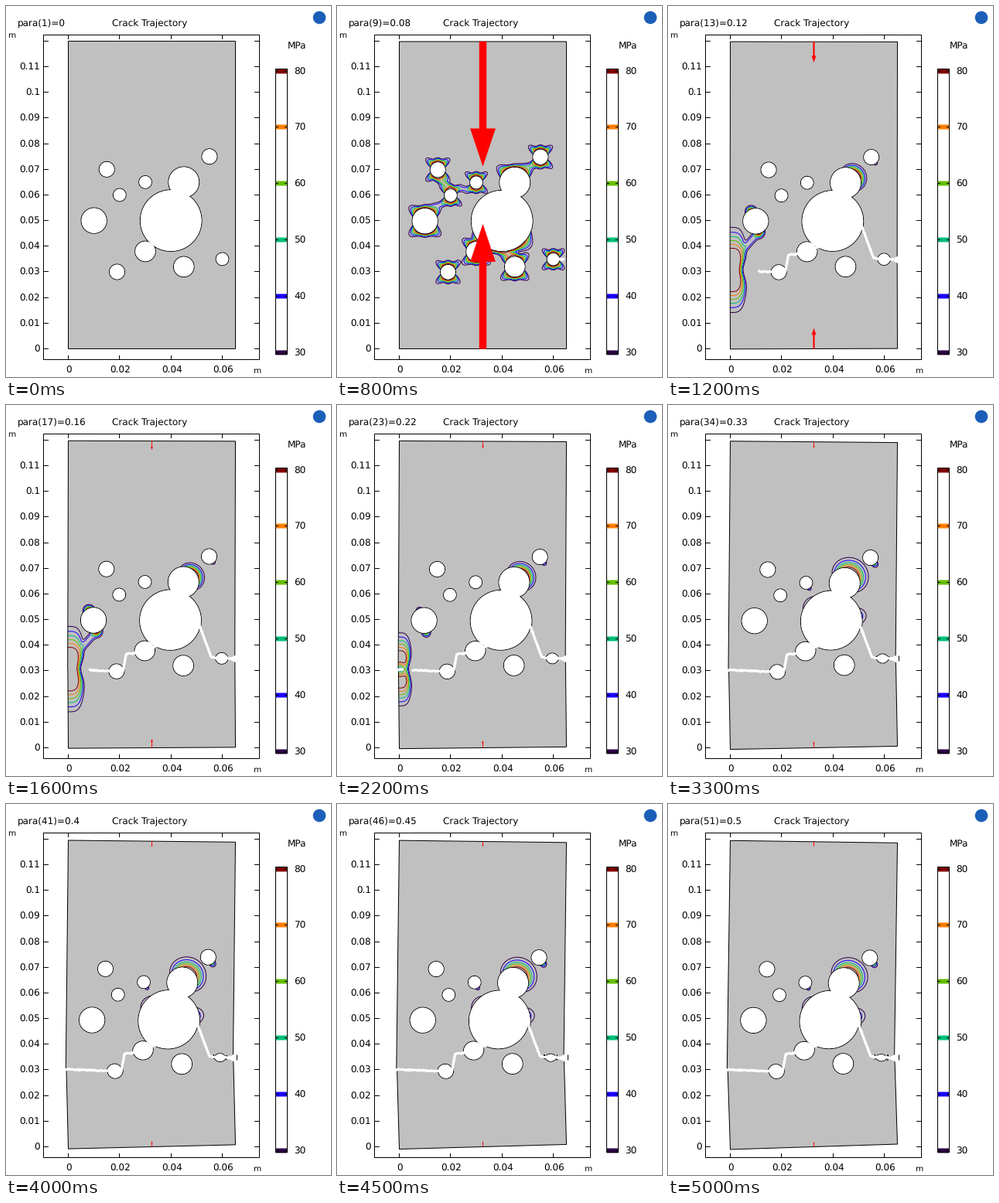
Animation, 420 px wide and 480 px high, one loop 5100 ms. Source, as a matplotlib script:

```python
import numpy as np
import matplotlib.pyplot as plt
from matplotlib.animation import FuncAnimation
from matplotlib.patches import Circle, Polygon, Rectangle

W, H, DPI = 420, 480, 100
FRAMES, STEP_MS = 51, 100
PX = 72 / DPI
SCALE = 3317                            # pixels per metre
LEFT, RIGHT, TOP, BOTTOM = 80.5, 296.5, 45.5, 443.5
MID = 188.5

LEVELS = [30, 40, 50, 60, 70, 80]
COLORS = ["#300048", "#1a00ff", "#00be78", "#64be00", "#ff7d00", "#820000"]

# hole centre and radius in millimetres
HOLES_MM = [(15, 70, 3), (10, 50, 5), (20, 60, 2.5), (30, 65, 2.5), (45, 65, 6),
            (40, 50, 12), (30, 38, 4), (19, 30, 3), (45, 32, 4), (60, 35, 2.5),
            (55, 75, 3)]
MM = SCALE / 1000
HOLES = [(LEFT + x * MM, BOTTOM - y * MM, r * MM) for x, y, r in HOLES_MM]

CRACK = np.array([(78, 341), (140, 344), (152, 343), (156, 322), (180, 318),
                  (251, 285), (266, 326), (299, 328)], float)

plt.rcParams.update({"font.family": "DejaVu Sans", "path.snap": False,
                     "text.hinting": "none"})
fig = plt.figure(figsize=(W / DPI, H / DPI), dpi=DPI, facecolor="white")
ax = fig.add_axes([0, 0, 1, 1])
ax.set_xlim(0, W)
ax.set_ylim(H, 0)
ax.axis("off")


# ---------- stress fields ----------
X, Y = np.meshgrid(np.linspace(LEFT, RIGHT, 217), np.linspace(TOP, BOTTOM, 399))


def combine(parts):
    return sum(p ** 4 for p in parts) ** 0.25


def rim(hole, deg):
    """Distance from a hole's rim and angle away from a direction on it."""
    cx, cy, r = hole
    z = (X - cx) + 1j * (cy - Y)
    return np.maximum(abs(z) - r, 0), np.angle(z * np.exp(-1j * np.radians(deg)))


def spot(k, deg, peak, depth, spread):
    """Hot spot on the rim of hole k, fading outwards and sideways."""
    gap, turn = rim(HOLES[k], deg)
    return peak * np.exp(-gap / depth - (turn / spread) ** 2)


def wings(hole, deg):
    """Butterfly lobes at a loaded pole."""
    gap, turn = rim(hole, deg)
    depth = 3.5 + 7 * np.exp(-((abs(turn) - 0.85) / 0.3) ** 2)
    return 95 * np.exp(-gap / depth - (turn / 1.2) ** 6)


def bridge(p, q, height, width):
    d = np.subtract(q, p)
    t = np.clip(((X - p[0]) * d[0] + (Y - p[1]) * d[1]) / (d @ d), 0, 1)
    d2 = (X - p[0] - t * d[0]) ** 2 + (Y - p[1] - t * d[1]) ** 2
    return height * np.exp(-d2 / width ** 2)


def loaded():
    """Lobes at every free pole, joined where two facing poles are close."""
    def free(x, y):
        return all(np.hypot(x - cx, y - cy) > r - 0.1 for cx, cy, r in HOLES)

    tops = [h for h in HOLES if free(h[0], h[1] - h[2] - 0.1)]
    bottoms = [h for h in HOLES if free(h[0], h[1] + h[2] + 0.1)]
    parts = [wings(h, 90) for h in tops] + [wings(h, -90) for h in bottoms]
    for x, y, r in bottoms:
        for x2, y2, r2 in tops:
            p, q = (x, y + r), (x2, y2 - r2)
            dist = np.hypot(q[0] - p[0], q[1] - p[1])
            if dist < 35:
                parts.append(bridge(p, q, 110 - 2 * dist, 6))
    return combine(parts)


def edge(width, height):
    """Bending stress on the left side, waisted at the crack line."""
    dy = Y - 341
    w = width * (1 - 0.25 * np.exp(-(dy / 14) ** 2))
    return 113 * np.exp(-((X - LEFT) / w) ** 4 - (dy / height) ** 2)


notch = 1 - 0.6 * np.exp(-((X - 83) / 8) ** 2 - ((Y - 341) / 10) ** 2)
bending = combine([edge(21, 48), bridge((96, 316), (114, 296), 48, 7),
                   spot(1, 115, 85, 5, 0.5), spot(1, -75, 95, 6, 0.5)])
tip = combine([edge(17, 41) * notch, spot(1, 115, 45, 5, 0.4), spot(1, -80, 75, 6, 0.4)])
side = combine([spot(4, 36, 95, 8, 1.05), spot(10, -55, 42, 6, 0.5)])
late = combine([spot(4, 55, 95, 13, 1.45), spot(10, -55, 65, 6, 0.5),
                spot(3, -60, 48, 6, 0.5), spot(5, 142, 40, 10, 0.5),
                spot(5, 12, 44, 15, 0.4)])

# field, key times and weights
FIELDS = [
    (loaded(), [0, 8, 9, 11], [0, 1, 1.08, 0]),
    (bending, [9, 11, 18, 22], [0, 1, 1, 0]),
    (tip, [18, 22, 26], [0, 1, 0]),
    (side, [9, 11, 20, 27], [0, 1, 1, 0]),
    (late, [20, 27], [0, 1]),
]


# ---------- motion of the two halves ----------
def shift(x, y, i, upper):
    """Rigid motion of the upper or lower half at step i."""
    u = np.clip((i - 8) / 42, 0, 1)
    if upper:
        a = 0.0142 * u
        return x - a * (y - TOP), y + a * (x - MID) + 3.3 * i / 50
    b = 0.032 * u
    return x - b * (BOTTOM - y), y - b * (x - MID)


def move(x, y, i):
    up = y < np.interp(x, *CRACK.T)
    return np.where(up, shift(x, y, i, True), shift(x, y, i, False))


def move_mid(x, y, i):
    return (np.array(shift(x, y, i, True)) + shift(x, y, i, False)) / 2


# ---------- static parts ----------
def label(x, y, s, size=12, ha="left"):
    return ax.text(x, y, s, fontsize=size * PX, ha=ha, va="baseline", color="black")


def line(x, y, z=2, lw=1.0, color="black"):
    return ax.plot(x, y, color=color, lw=lw * PX, zorder=z)[0]


def box(x, y, w, h, z=2, **style):
    ax.add_patch(Rectangle((x, y), w, h, lw=PX, zorder=z, **style))


box(48.5, 37.5, 279, 420, fc="none", ec="black")
for k in range(13):
    y = np.floor(BOTTOM - k * 10 * MM) + 0.5
    line([48.5, 54.5], [y, y])
    line([321.5, 327.5], [y, y])
    if k < 12:
        label(44, y + 4, f"{k / 100:g}", ha="right")
for k in range(4):
    x = np.floor(LEFT + k * 20 * MM) + 0.5
    line([x, x], [37.5, 42.5])
    line([x, x], [452.5, 457.5])
    label(x + 1, 475, f"{k / 50:g}", ha="center")

label(2, 41, "m", 10.5)
label(319, 475, "m", 10.5)
label(137, 26, "Crack Trajectory")
label(364, 55, "MPa")
title = label(15, 26, "")
ax.add_patch(Circle((405, 15), 8.3, fc="#1c5fb8", ec="none"))

box(348.5, 81.5, 15, 369, fc="none", ec="black")
for level, color in zip(LEVELS, COLORS):
    y = np.floor(448 - (level - 30) * 7.28) + 0.5
    box(348.5, y - 3, 15, 6, 1, fc=color, ec="none")
    line([348.5, 351.5], [y, y])
    line([360.5, 363.5], [y, y])
    label(372.5, y + 4, str(level))


# ---------- moving parts ----------
def polygon(z, fc="none", ec="none", lw=1.0):
    return ax.add_patch(Polygon([(0, 0), (1, 0), (1, 1)], fc=fc, ec=ec, lw=lw * PX, zorder=z))


def along(points, count):
    """Evenly spaced points along a polyline."""
    px, py = np.array(points, float).T
    s = np.append(0, np.cumsum(np.hypot(np.diff(px), np.diff(py))))
    q = np.linspace(0, s[-1], count)
    return np.interp(q, s, px), np.interp(q, s, py)


corners = [(LEFT, TOP), (RIGHT, TOP), (RIGHT, BOTTOM), (LEFT, BOTTOM), (LEFT, TOP)]
border = along(corners, 1229)
bodies = [(polygon(1, "#c0c0c0"), border), (polygon(3.5, "none", "black"), border)]

theta = np.linspace(0, 2 * np.pi, 160, endpoint=False)
for cx, cy, r in HOLES:
    for z, edge_color, radius in ((4, "black", r), (5, "none", r - 0.5)):
        circle = cx + radius * np.cos(theta), cy + radius * np.sin(theta)
        bodies.append((polygon(z, "white", edge_color), circle))

rng = np.random.default_rng(4)
crack_x, crack_y = along(CRACK, 220)
crack_y = crack_y + rng.normal(0, 0.4, crack_y.size)
# step at which the crack opens, by position
opens = np.interp(crack_x, [81, 91, 99, 109, 120, 134, 154, 168, 250, 273, 290, 299],
                  [18, 26, 22, 16, 11, 9, 11, 8, 9, 11, 7, 10])
crack = line([], [], 6, 3.2, "white")
wedge = polygon(6, "white")
wedge_x, wedge_y = np.array([288, 298, 298]), np.array([328, 323, 333])
stub = line([298.5, 298.5], [325, 331], 6.5)
arrows = [polygon(7, "red", "red", 0.4) for _ in range(2)]


def arrow_shape(y, length, sign):
    w, hw, neck = 0.028 * length, 0.1 * length, 0.7 * length
    px = np.array([-w, -w, -hw, 0, hw, w, w])
    py = np.array([0, neck, neck, length, neck, neck, 0])
    return np.column_stack([MID + px, y + sign * py])


state = {"contour": None}


def draw_contours(i):
    if state["contour"] is not None:
        state["contour"].remove()
        state["contour"] = None
    z = sum(np.interp(i, t, w) * f for f, t, w in FIELDS)
    if z.max() > LEVELS[0]:
        mx, my = move(X, Y, i)
        state["contour"] = ax.contour(mx, my, z, levels=LEVELS, colors=COLORS,
                                      linewidths=PX, zorder=3)


def draw(i):
    title.set_text(f"para({i + 1})={i / 100:g}")
    for art, (px, py) in bodies:
        art.set_xy(move(px, py, i).T)
    draw_contours(i)

    cx, cy = move_mid(crack_x, crack_y, i)
    crack.set_data(np.where(opens <= i, cx, np.nan), cy)
    wedge.set_xy(move_mid(wedge_x, wedge_y, i).T)
    wedge.set_visible(i >= 9)
    stub.set_visible(i >= 30)

    length = np.interp(i, [0, 8, 9, 11, 16, 22, 50], [0, 161, 172, 30, 11, 9, 6])
    top = shift(MID, TOP, i, True)[1]
    for art, y, sign in zip(arrows, (top, BOTTOM), (1, -1)):
        art.set_visible(i > 0)
        art.set_xy(arrow_shape(y, length, sign))
    return []


anim = FuncAnimation(fig, draw, frames=FRAMES, interval=STEP_MS,
                     init_func=lambda: draw(0), repeat=True, repeat_delay=0, blit=False)
plt.show()
```
